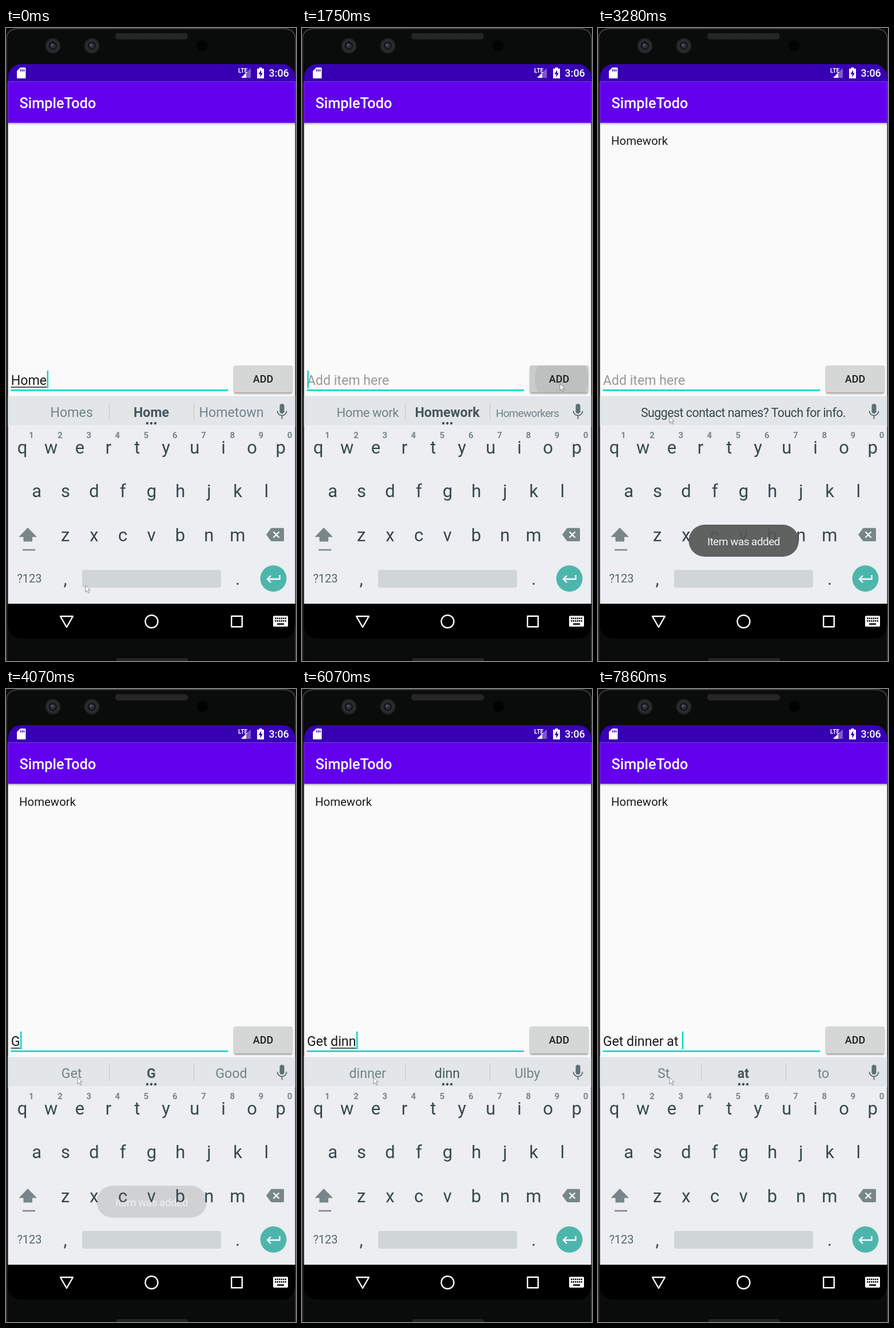
Recreate the animation shown at these times as an HTML page. Size 507 by 1105 pixels, loop 8 s.

```html
<!DOCTYPE html>
<html lang="en">
<head>
<meta charset="utf-8">
<title>Todo list</title>
<style>
  html, body { margin: 0; width: 100%; height: 100%; overflow: hidden; background: #0a0b0b; }
  svg { display: block; width: 100vw; height: 100vh; }
  text { font-family: Roboto, sans-serif; white-space: pre; }
  .mid { text-anchor: middle; }
  .entry { font-size: 23.2px; fill: #1c1c1c; }
  .key { font-size: 31px; fill: #37474f; }
  .digit { font-size: 15px; font-weight: 700; fill: #76858c; }
  .word { font-size: 23.2px; fill: #73828a; }
  .word.long { font-size: 22px; letter-spacing: -.45px; }
  .word.longest { font-size: 19px; letter-spacing: -.75px; }
  #w1 { fill: #46565e; }
  .tip { font-size: 21.4px; letter-spacing: -.54px; fill: #37474f; }
</style>
</head>
<body>
<svg viewBox="0 0 507 1105" preserveAspectRatio="none">
  <defs>
    <clipPath id="screen"><rect x="3.5" y="63" width="502" height="1003" rx="23"/></clipPath>
    <clipPath id="addBox"><rect x="398.5" y="589" width="102" height="47" rx="2.5"/></clipPath>
    <pattern id="mesh" width="4" height="4" patternUnits="userSpaceOnUse">
      <rect width="4" height="4" fill="#1b1b1b"/><path d="M0 4L4 0M0 0L4 4" stroke="#353535" stroke-width=".8"/>
    </pattern>
    <linearGradient id="barShade" x2="0" y2="1">
      <stop stop-color="#000" stop-opacity=".28"/><stop offset="1" stop-color="#000" stop-opacity="0"/>
    </linearGradient>
    <filter id="soft" x="-10%" y="-20%" width="120%" height="150%"><feGaussianBlur stdDeviation="1.4"/></filter>
    <g id="lens">
      <circle r="13.5" fill="#202224"/><circle r="11" fill="#2b2d30"/><circle r="7.5" fill="#15181b"/>
      <circle r="4.5" fill="#2c3238"/><circle cx="-1.5" cy="-1.5" r="1.8" fill="#59636c"/>
    </g>
  </defs>

  <!-- phone body -->
  <rect width="507" height="1105" fill="#0a0b0b"/>
  <path d="M1 1105V20Q1 1 24 1H483Q506 1 506 20V1105" fill="none" stroke="#4a4b4c" stroke-width="1.3"/>
  <rect x="191" y="9" width="127" height="11" rx="5" fill="url(#mesh)"/>
  <rect x="193" y="1100" width="125" height="8" rx="4" fill="url(#mesh)"/>
  <use href="#lens" x="82" y="31"/><use href="#lens" x="150" y="31"/>
  <circle cx="343" cy="31" r="9.5" fill="#020202"/>

  <g clip-path="url(#screen)">
    <rect y="63" width="507" height="1003" fill="#000"/>
    <rect y="93" width="507" height="550" fill="#fafafa"/>
    <rect y="165" width="507" height="5" fill="url(#barShade)"/>
    <rect y="63" width="507" height="30.5" fill="#3700b3"/>
    <rect y="93.5" width="507" height="72" fill="#6200ee"/>

    <!-- status bar -->
    <path d="M25 69H33Q34.500 69 34.500 70.500V86.500Q34.500 88 33 88H20.500Q19 88 19 86.500V75Z" fill="#fff"/>
    <path d="M25.500 72V76M28.500 72V76M31.500 72V76" stroke="#3700b3" stroke-width="1.5"/>
    <text x="406" y="77.500" font-size="10" font-weight="700" fill="#fff" textLength="">LTE</text>
    <path d="M428 70V87H411Z" fill="#fff" opacity=".35"/>
    <path d="M420 78V87H411Z" fill="#fff"/>
    <path d="M442.500 69H447.500V71H451V88H439V71H442.500Z" fill="#fff"/>
    <path d="M446 73L441.500 80.500H444.500V86L448.800 78.500H446Z" fill="#3700b3"/>
    <text x="459.500" y="85" font-size="17.900" font-weight="500" fill="#fff">3:06</text>
    <text x="23.500" y="140" font-size="25.300" font-weight="500" fill="#fff">SimpleTodo</text>

    <text id="item" x="23" y="204" font-size="20.400" fill="#1c1c1c">Homework</text>

    <!-- input row -->
    <text id="entry" class="entry" x="8.700" y="623"/>
    <rect id="compose" y="626.200" height="1.500" fill="#1c1c1c"/>
    <rect id="caret" y="598" width="2.500" height="31" fill="#03dac5"/>
    <rect x="8.500" y="631" width="379.500" height="2.600" fill="#03dac5"/>
    <rect x="398.500" y="591" width="102" height="47.500" rx="3" fill="#000" opacity=".36" filter="url(#soft)"/>
    <rect x="398.500" y="589" width="102" height="47" rx="2.500" fill="#d5d7d7"/>
    <g clip-path="url(#addBox)" id="ripple">
      <rect x="398" y="589" width="104" height="48" opacity=".05"/>
      <circle id="wave" cx="454" cy="613" opacity=".06"/>
    </g>
    <text class="mid" x="449.500" y="619.300" font-size="17.900" font-weight="500" fill="#1c1c1c">ADD</text>

    <!-- keyboard -->
    <rect y="643" width="507" height="362" fill="#eceef1"/>
    <rect y="643" width="507" height="51" fill="#e2e6e9"/>
    <path d="M0 694.500H507" stroke="#f6f7f8"/>
    <path d="M0 642.500H507" stroke="#eef0f1"/>
    <g id="words">
      <path d="M180.500 654V685M328.500 654V685" stroke="#c6ccd0" stroke-width="1.300"/>
      <text id="w0" class="word mid" x="114.700" y="679"/>
      <text id="w1" class="word mid" x="254" y="679"/>
      <text id="w2" class="word mid" x="394" y="679"/>
      <g fill="#3f4f57"><circle cx="247" cy="690" r="2.200"/><circle cx="254" cy="690" r="2.200"/><circle cx="261" cy="690" r="2.200"/></g>
    </g>
    <text id="tip" class="tip mid" x="254" y="678.500">Suggest contact names? Touch for info.</text>
    <g fill="none" stroke="#5f6f77" stroke-width="2">
      <rect x="478.500" y="656" width="8" height="17" rx="4" fill="#5f6f77" stroke="none"/>
      <path d="M474.500 668.500A8 8 0 0 0 490.500 668.500M482.500 677V682.500"/>
    </g>
    <g id="keys"></g>
    <path d="M38 872L54 888.500H46V896.500H30.500V888.500H22.500Z" fill="#78868a"/>
    <path d="M29 911H51" stroke="#78868a" stroke-width="2.500"/>
    <path d="M455 884.500L463 873.500Q463.700 872.800 465 872.800H484Q486 872.800 486 874.800V894Q486 896 484 896H465Q463.700 896 463 895.300Z" fill="#78868a"/>
    <path d="M467.500 879.500L477.500 889.500M477.500 879.500L467.500 889.500" stroke="#fff" stroke-width="2.300"/>
    <text class="mid" x="41" y="968" font-size="20" fill="#55666e">?123</text>
    <rect x="133" y="946" width="243" height="31" rx="4" fill="#d0d5d7"/>
    <circle cx="467.500" cy="961" r="23" fill="#4db6ac"/>
    <path d="M478.500 955V962H458M463 956L457 962L463 968" fill="none" stroke="#fff" stroke-width="2.400"/>

    <!-- navigation bar -->
    <g fill="none" stroke="#fff" stroke-width="2.400" stroke-linejoin="round">
      <path d="M95 1027H117L106 1046Z"/><circle cx="254.500" cy="1036" r="11"/>
      <rect x="394.200" y="1026.700" width="18.600" height="18.600"/>
    </g>
    <rect x="467" y="1026" width="26" height="19" rx="2" fill="#fff"/>
    <path d="M470 1030.500H490M470 1035H490" stroke="#000" stroke-width="2.400" stroke-dasharray="2.400 1.150"/>
    <path d="M474 1040.500H486" stroke="#000" stroke-width="2.400"/>

    <g id="toast">
      <rect x="158.500" y="867" width="192.500" height="56" rx="28" fill="#555" opacity=".92"/>
      <text class="mid" x="254.500" y="902.500" font-size="19" letter-spacing="-.55" fill="#f4f4f4">Item was added</text>
    </g>
  </g>
  <path id="pointer" d="M0 0V11.500L2.700 9L4.700 13.500L6.700 12.600L4.700 8.200H8.200Z" fill="#fff" stroke="#6d6d6d" stroke-width=".8"/>
</svg>

<script>
const $ = id => document.getElementById(id);
const LOOP = 8000, LEFT = 8.7, PITCH = 50.2;

const label = (cls, x, y, s) => `<text class="${cls} mid" x="${x}" y="${y}">${s}</text>`;
const row = (chars, x, y, cls = 'key') =>
  [...chars].map((c, i) => label(cls, x + i * PITCH, y, c)).join('');
$('keys').innerHTML = row('1234567890', 44.3, 716, 'digit') + row('qwertyuiop', 28.5, 743)
  + row('asdfghjkl', 53.7, 819) + row('zxcvbnm', 103.7, 896)
  + label('key', 103.5, 972, ',') + label('key', 405, 972, '.');

// Each step changes some fields and keeps the rest.
const steps = [
  [0, { text: 'Home', line: true, caret: true, bold: true, words: 'Homes|Home|Hometown',
        at: [139, 973], item: false, toast: 0, wave: 0 }],
  [120, { text: 'Homew' }],
  [240, { text: 'Homewo', bold: false, words: 'Homework|Homewo|Homeworkers' }],
  [390, { text: 'Homework', line: false }],
  [540, { line: true, bold: true, words: 'Home work|Homework|Homeworkers' }],
  [970, { caret: false, at: [190, 915] }],
  [1090, { at: [320, 785] }],
  [1210, { at: [430, 680] }],
  [1330, { at: [466, 634] }],
  [1480, { caret: true, at: [451, 621] }],
  [1750, { text: '', wave: 47 }],
  [1900, { item: true, toast: .3, wave: 70, at: [440, 628] }],
  [2020, { words: '', toast: .75, wave: 0, at: [325, 655] }],
  [2140, { toast: 1, at: [180, 676] }],
  [2260, { caret: false, at: [125, 678] }],
  [2690, { caret: true }],
  [3280, { caret: false }],
  [3710, { caret: true }],
  [3830, { text: 'G', toast: .85 }],
  [3950, { words: 'Get|G|Good', toast: .53 }],
  [4070, { toast: .2 }],
  [4220, { text: 'Ge', toast: .04 }],
  [4340, { text: 'Get', words: 'Gets|Get|Getting', toast: 0 }],
  [4460, { text: 'Get ', line: false }],
  [4740, { words: '' }],
  [5010, { caret: false }],
  [5440, { text: 'Get d', line: true, caret: true }],
  [5560, { text: 'Get di' }],
  [5710, { text: 'Get din' }],
  [5830, { bold: true, words: 'did|din|dining' }],
  [5950, { text: 'Get dinn' }],
  [6070, { bold: false, words: 'dinner|dinn|Ulby' }],
  [6340, { text: 'Get dinne' }],
  [6460, { text: 'Get dinner', words: 'dinner|dinne|dinners' }],
  [6610, { bold: true, words: 'diners|dinner|Dinners' }],
  [7170, { caret: false }],
  [7320, { text: 'Get dinner ', line: false, caret: true }],
  [7440, { text: 'Get dinner a', line: true }],
  [7590, { text: 'Get dinner at' }],
  [7710, { words: 'am|a|an' }],
  [7860, { text: 'Get dinner at ', line: false, words: 'St|at|to' }],
];
let last = {};
const states = steps.map(([time, change]) => ({ time, ...(last = { ...last, ...change }) }));

const pen = document.createElement('canvas').getContext('2d');
const width = s => {
  pen.font = '23.2px Roboto, sans-serif';
  return pen.measureText(s).width;
};
const show = (id, on) => $(id).style.display = on ? '' : 'none';

function draw(s) {
  const entry = $('entry');
  entry.textContent = s.text || 'Add item here';
  entry.style.fill = s.text ? '' : '#999';

  const end = LEFT + width(s.text);
  const start = LEFT + width(s.text.slice(0, s.text.lastIndexOf(' ') + 1));
  $('compose').setAttribute('x', start);
  $('compose').setAttribute('width', end - start);
  show('compose', s.line);
  $('caret').setAttribute('x', end + .5);
  show('caret', s.caret);

  show('words', s.words);
  show('tip', !s.words);
  s.words.split('|').forEach((word, i) => {
    const size = word.length > 10 ? 'longest' : word.length > 8 ? 'long' : '';
    $('w' + i).textContent = word;
    $('w' + i).setAttribute('class', `word mid ${size}`);
  });
  $('w1').style.fontWeight = s.bold ? 700 : 400;

  show('item', s.item);
  show('ripple', s.wave);
  $('wave').setAttribute('r', s.wave);
  $('toast').style.opacity = s.toast;
  $('pointer').setAttribute('transform', `translate(${s.at})`);
}

let shown;
function tick() {
  const t = performance.now() % LOOP;
  const state = states.findLast(s => s.time <= t);
  if (state !== shown) draw(shown = state);
  requestAnimationFrame(tick);
}
tick();
</script>
</body>
</html>
```
